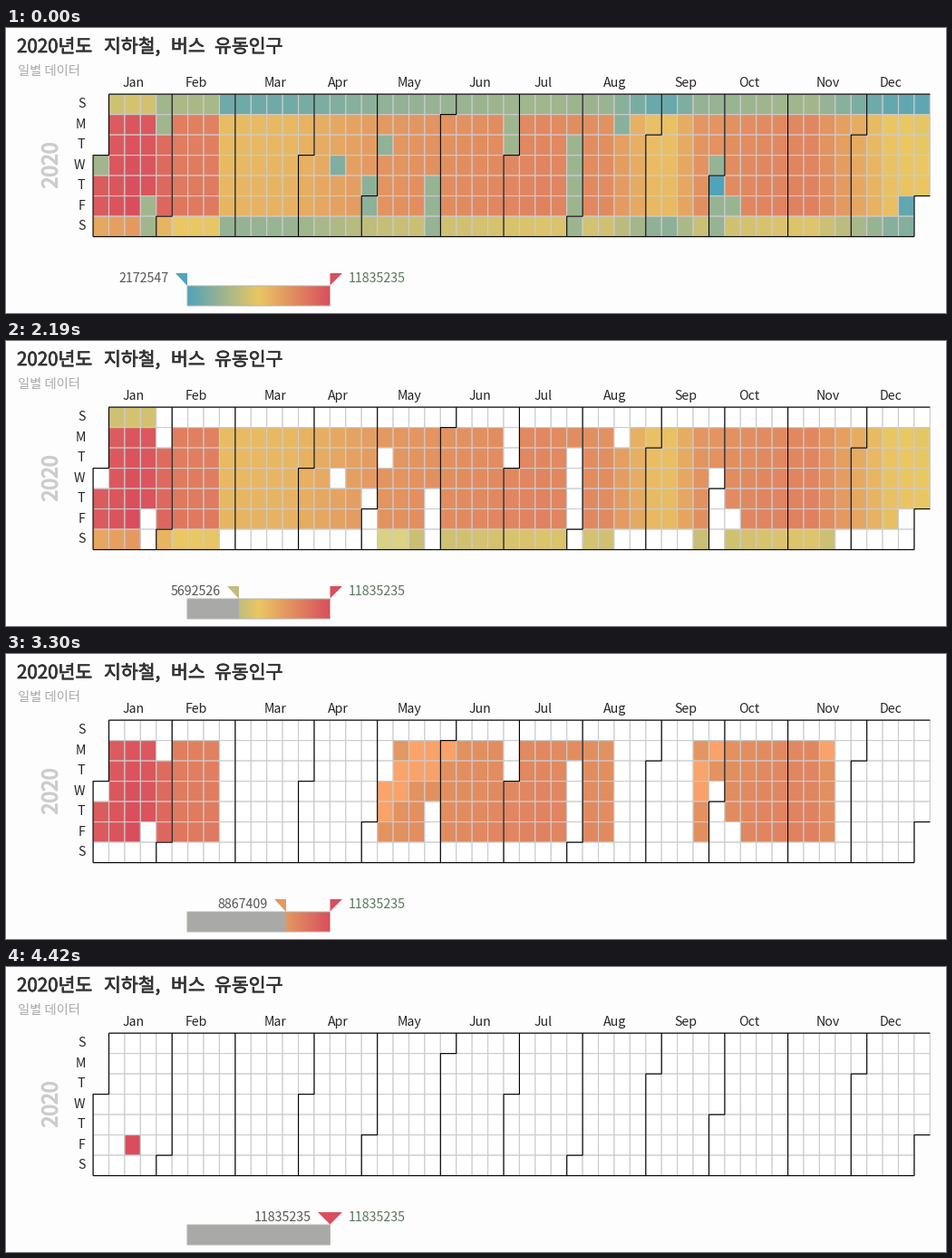
A matplotlib script for the animation above (8 s loop, 1037 px wide and 315 px high).

```python
import numpy as np
import matplotlib.pyplot as plt
from matplotlib import patheffects
from matplotlib.animation import FuncAnimation
from matplotlib.collections import PolyCollection
from matplotlib.colors import LinearSegmentedColormap
from matplotlib.patches import Polygon, Rectangle

W, H, DPI = 1037, 315, 64
PX = 72 / DPI
LINE = 1.125 * PX
FRAMES, INTERVAL = 200, 40

LOW, HIGH = 2172547, 11835235
LEFT, TOP, CELL_W, CELL_H = 96.1, 73.125, 17.42, 22.5
BAR_X, BAR_Y, BAR_W, BAR_H = 200, 285, 157.5, 22
STEPS = 140  # slider resolution
RAMP = LinearSegmentedColormap.from_list(
    "ramp", ["#50a3ba", "#eac763", "#d94e5d"], N=512)

# Weekday trend in millions of riders: a spring drop, recovery, two later dips
TREND = {0: 11.1, 2: 11.6, 3: 11.45, 4: 10.6, 5: 9.95, 7: 9.85, 8: 7.5,
         12: 7.65, 18: 8.9, 28: 9.55, 32: 9.2, 35: 7.35, 36: 7.3, 38: 9.0,
         42: 9.45, 45: 9.6, 50: 7.1, 52: 6.9}
# Quiet stretches: first calendar slot -> number of days
HOLIDAYS = {3: 1, 26: 4, 108: 1, 123: 2, 128: 1, 151: 3, 182: 3, 212: 5,
            232: 1, 276: 4, 285: 1, 362: 1}
QUIETEST = 277
# Slider position over time in ms
PATH = {380: 0, 670: 12, 880: 12, 920: 14, 960: 14, 1640: 34, 2160: 51,
        2880: 82, 3560: 107, 4210: 135, 4400: 140}


def follow(points, x):
    return np.interp(x, list(points), list(points.values()))


def color(value):
    return RAMP((np.asarray(value) - LOW) / (HIGH - LOW))


def grid(col, row):
    return LEFT + col * CELL_W, TOP + row * CELL_H


def label(x, y, text, size=14.2, color="#262626", bold=0, **kw):
    item = ax.text(x, y, text, fontsize=size * PX, color=color,
                   family="Noto Sans CJK JP", **kw)
    if bold:
        item.set_path_effects(
            [patheffects.withStroke(linewidth=bold * PX, foreground=color)])
    return item


def daily_riders():
    weekday = follow(TREND, week)
    saturday = 1.1 * weekday - 3.95
    sunday = 0.72 * saturday
    riders = np.select([day == 0, day == 6], [sunday, saturday],
                       weekday + 0.07 * (day - 2))
    for first, length in HOLIDAYS.items():
        off = (slot >= first) & (slot < first + length)
        riders[off] = np.minimum(sunday[off], 4.7)
    riders[slot == QUIETEST] = LOW / 1e6
    return np.round(np.interp(riders, (riders.min(), riders.max()), (LOW, HIGH)))


slot = np.arange(366) + 3  # the year starts on a Wednesday
week, day = slot // 7, slot % 7
riders = daily_riders()
base_colors = color(riders)
lifted_colors = base_colors.copy()
lifted_colors[:, :3] = np.minimum(base_colors[:, :3] * 1.1, 1)

fig = plt.figure(figsize=(W / DPI, H / DPI), dpi=DPI, facecolor="#fdfdfd")
ax = fig.add_axes([0, 0, 1, 1])

# Bar gradient, covered in grey up to the slider
ax.imshow(np.linspace(0, 1, 316)[None], cmap=RAMP, aspect="auto",
          extent=(BAR_X, BAR_X + BAR_W, BAR_Y + BAR_H, BAR_Y))
ax.set_xlim(0, W)
ax.set_ylim(H, 0)
ax.axis("off")
muted = ax.add_patch(Rectangle((BAR_X, BAR_Y), 0, BAR_H, color="#a9a9a8", lw=0))
ax.add_patch(Rectangle((BAR_X, BAR_Y), BAR_W, BAR_H, fill=False,
                       edgecolor="#b4b4aa", lw=PX, snap=False))

corners = [(0, 0), (1, 0), (1, 1), (0, 1)]
cells = ax.add_collection(PolyCollection(
    [[grid(w + dx, d + dy) for dx, dy in corners] for w, d in zip(week, day)],
    edgecolors="#cccccc", linewidths=LINE, snap=False))


def outline(*points):
    xs, ys = zip(*(grid(*p) for p in points))
    ax.plot(xs, ys, color="black", lw=LINE, snap=False,
            solid_joinstyle="miter", solid_capstyle="butt")


outline((53, 5), (52, 5), (52, 7))
outline((1, 0), (53, 0))
outline((0, 7), (52, 7))
names = "Jan Feb Mar Apr May Jun Jul Aug Sep Oct Nov Dec".split()
first = 3
for name, length in zip(names, [31, 29, 31, 30, 31, 30, 31, 31, 30, 31, 30, 31]):
    c, r = divmod(first, 7)
    step = [(c + 1, 0), (c + 1, r)] if r else [(c, 0)]
    outline(*step, (c, r), (c, 7))
    last = (first + length - 1) // 7
    label(grid((c + last + 1) / 2, 0)[0] + 0.5, 65, name, ha="center")
    first += length

for r, letter in enumerate("SMTWTFS"):
    label(87.5, grid(0, r + .5)[1] + 4, letter, ha="right")
for x, word in [(12, "2020년도"), (108, "지하철,"), (182, "버스"), (230, "유동인구")]:
    label(x, 27, word, 20.5, "#333333", bold=0.7)
label(13, 52, "일별 데이터", 14.3, "#aaaaaa")
label(50, 152, "2020", 23, "#cccccc", bold=1.3, rotation=90,
      ha="center", va="center")

end = BAR_X + BAR_W
ax.add_patch(Polygon([(end, 271), (end + 13.5, 271), (end, 284.5)],
                     color=color(HIGH), lw=0))
label(end + 20.5, 281, str(HIGH), color="#5a755c")
handle = ax.add_patch(Polygon([(0, 0), (1, 0), (1, 1)], lw=0))
reading = label(0, 281, "", color="#555555", ha="right")


def update(frame):
    k = round(float(follow(PATH, frame * INTERVAL)))
    low = round(LOW + k / STEPS * (HIGH - LOW))
    x = BAR_X + k / STEPS * BAR_W

    faces = base_colors.copy()
    if 0 < k < STEPS:  # days close to the slider light up
        near = (riders > low + 1e5) & (riders < low + 2.5e5)
        faces[near] = lifted_colors[near]
    faces[riders < low] = 1
    cells.set_facecolor(faces)

    muted.set_width(x - BAR_X)
    handle.set_xy([(x - 13.5, 271), (x, 271), (x, 284.5)])
    handle.set_facecolor(color(low))
    reading.set_x(x - 20.3)
    reading.set_text(str(low))
    return cells, muted, handle, reading


anim = FuncAnimation(fig, update, frames=FRAMES, interval=INTERVAL,
                     repeat=True, repeat_delay=0, blit=False)
plt.show()
```
